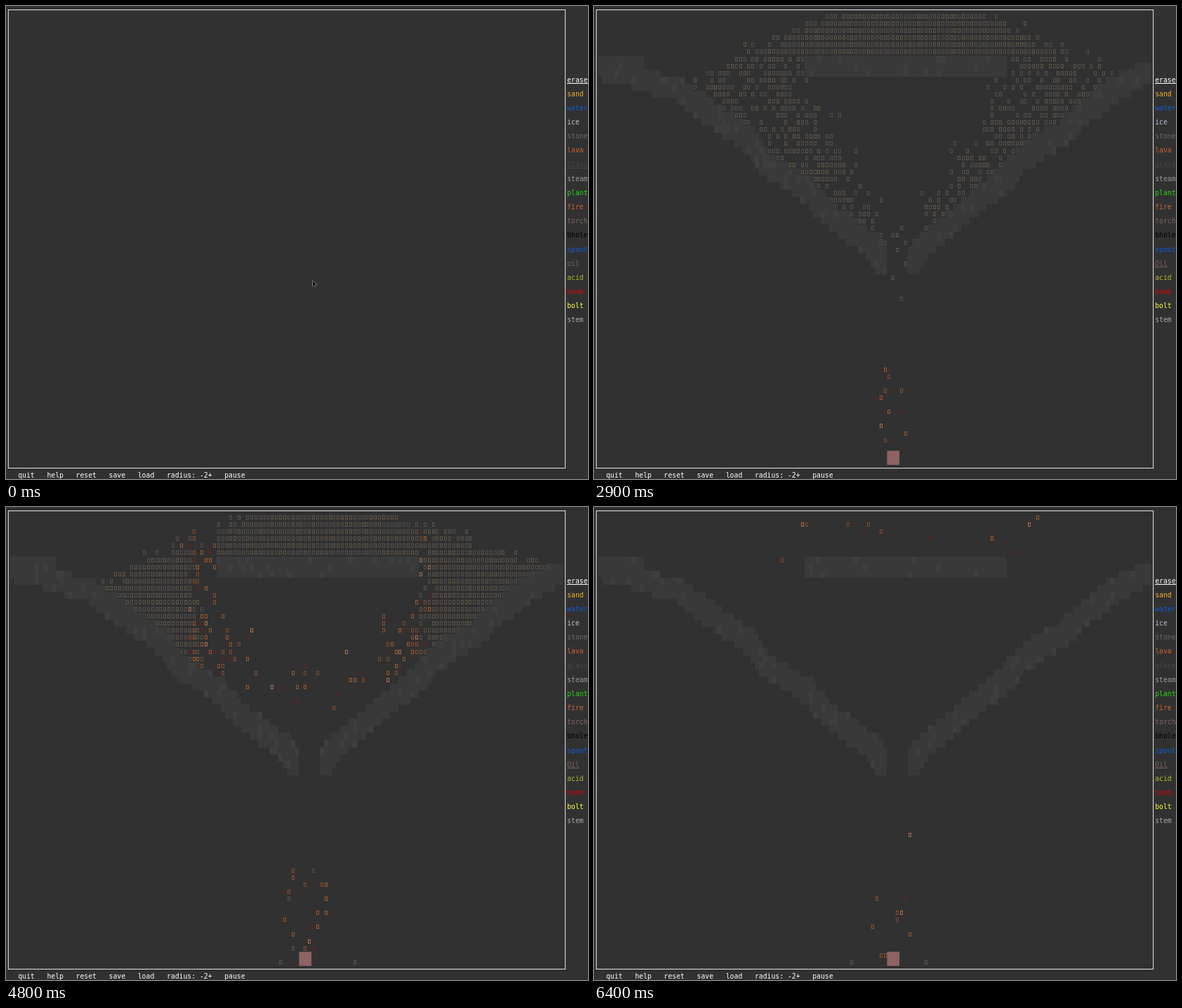
An HTML page with a canvas for the animation above (6.5 s loop, 829 by 675 pixels).

```html
<!DOCTYPE html>
<html lang="en">
<head>
<meta charset="utf-8">
<title>Falling sand</title>
<style>
  html, body { margin: 0; width: 100%; height: 100%; overflow: hidden; background: #313131; }
  #stage { position: relative; width: 829px; height: 675px; overflow: hidden; }
  canvas { position: absolute; left: 0; top: 0; }
  .label {
    position: absolute; white-space: pre; color: #fff;
    font: 9.77px/10px "DejaVu Sans Mono", monospace;
  }
  .label.on { box-shadow: inset 0 -1px 0 currentColor; }
</style>
</head>
<body>
<div id="stage"><canvas id="view" width="829" height="675"></canvas></div>
<script>
const LOOP = 6500, STEP = 100;
const COLS = 141, ROWS = 67;
const CW = 829 / COLS, RH = 675 / ROWS;
const LAST_COL = 134, LAST_ROW = 64, THROAT = 73, SHELF_MID = 75;
const stage = document.getElementById('stage');
const ctx = document.getElementById('view').getContext('2d');

const menu = [
  ['erase', '#ffffff'], ['sand', '#f6b02c'], ['water', '#0b5fd6'], ['ice', '#b2c2d4'],
  ['stone', '#696969'], ['lava', '#d0622a'], ['glass', '#464646'], ['steam', '#9b9b9b'],
  ['plant', '#24d80f'], ['fire', '#c9652d'], ['torch', '#83645d'], ['bhole', '#000000'],
  ['spout', '#0b5fd6'], ['oil', '#7d6059'], ['acid', '#b3b52a'], ['bomb', '#c60b0b'],
  ['bolt', '#fcfc40'], ['stem', '#a9a9a9']
];
const oilTones = ['#554d49', '#5d5349', '#625643', '#514c49', '#594f4a'];
const fireTones = ['#9a5529', '#804829', '#a97050', '#a25a28', '#612421', '#8a4d2f'];

function hash(a, b = 0, c = 0) {
  let h = Math.imul(a + 11, 374761393) ^ Math.imul(b + 57, 668265263) ^ Math.imul(c + 131, 1274126177);
  h = Math.imul(h ^ (h >>> 15), 2246822519);
  h = Math.imul(h ^ (h >>> 13), 3266489917);
  return ((h ^ (h >>> 16)) >>> 0) / 4294967296;
}
const clamp = (v, lo, hi) => Math.min(hi, Math.max(lo, v));
const pick = (list, h) => list[Math.floor(h * list.length)];

// Glass: cells in the order a 3 by 3 brush paints them along a path.
const glass = new Set();
const cellId = (c, r) => r * COLS + c;
function stroke(...path) {
  for (let i = 1; i < path.length; i++) {
    const [c0, r0] = path[i - 1], [c1, r1] = path[i];
    const n = 2 * Math.max(Math.abs(c1 - c0), Math.abs(r1 - r0));
    for (let s = 0; s <= n; s++) {
      const c = Math.round(c0 + (c1 - c0) * s / n);
      const r = Math.round(r0 + (r1 - r0) * s / n);
      for (let k = 0; k < 9; k++) glass.add(cellId(c - 1 + k % 3, r - 1 + Math.floor(k / 3)));
    }
  }
}
stroke([10, 9], [3, 9], [2, 8], [10, 8], [10, 10], [19, 11], [28, 15], [38, 19],
  [41, 22], [50, 25], [56, 29], [68, 34], [69, 36]);
stroke([133, 9], [126, 11], [115, 16], [115, 17], [108, 19], [101, 22], [101, 23],
  [88, 29], [80, 33], [77, 35], [77, 36]);
const arms = [...glass];
stroke([52, 8], [98, 8]);
const panes = [...glass];

// First and last open column between the two arms, per row.
const openFrom = Array(ROWS).fill(1), openTo = Array(ROWS).fill(LAST_COL);
for (const id of arms) {
  const c = id % COLS, r = Math.floor(id / COLS);
  if (c < THROAT) openFrom[r] = Math.max(openFrom[r], c + 1);
  else openTo[r] = Math.min(openTo[r], c - 1);
}
function isOpen(c, r) {
  return r >= 1 && r <= LAST_ROW && c >= openFrom[r] && c <= openTo[r] && !glass.has(cellId(c, r));
}

function addLabel(text, col, row, color) {
  const el = document.createElement('span');
  el.className = 'label';
  el.textContent = text;
  el.style.left = (col * CW - 0.4) + 'px';
  el.style.top = (row * RH) + 'px';
  el.style.color = color;
  stage.append(el);
  return el;
}
const items = menu.map(([name, color], i) => addLabel(name, 136, 10 + 2 * i, color));
addLabel('quit   help   reset   save   load   radius: -2+   pause', 3, 66, '#ffffff');

function showMenu(t) {
  const chosen = t < 600 ? 'glass' : t < 1000 ? 'torch' : 'oil';
  menu.forEach(([name], i) => {
    const on = name === chosen;
    items[i].textContent = on ? name[0].toUpperCase() + name.slice(1) : name;
    items[i].classList.toggle('on', on || i === 0);
  });
}

function mark(c, r, color) {
  ctx.strokeStyle = color;
  ctx.strokeRect(Math.round((c + 0.5) * CW - 2) + 0.5, Math.round((r + 0.5) * RH - 3) + 0.5, 3, 5);
}
function flame(c, r, seed, f) {
  c = Math.round(c);
  r = Math.max(1 + Math.floor(hash(seed, f, 6) * 4), Math.round(r));
  if (isOpen(c, r)) mark(c, r, pick(fireTones, hash(seed, f, 5)));
}

function drawGlass(t, f) {
  const count = Math.round(clamp(t / 600, 0, 1) * panes.length);
  for (const id of panes.slice(0, count)) {
    const c = id % COLS, r = Math.floor(id / COLS);
    const x = Math.round(c * CW), y = Math.round(r * RH);
    ctx.fillStyle = hash(c, r, f) < 0.1 ? '#3e3e3e' : '#393939';
    ctx.fillRect(x, y, Math.round((c + 1) * CW) - x, Math.round((r + 1) * RH) - y);
  }
}

// Chance that a cell holds oil: dense inside the pile, loose at its edges.
function oilChance(c, r, t) {
  const k = clamp((t - 1500) / 2400, 0, 1);
  const left = 62 - 8 * Math.min(1, 3 * k) - (1.7 + 1.8 * Math.min(1, 2 * k)) * (r - 1);
  const right = 88 + 10 * Math.min(1, 2 * k) + (1.5 + 3.5 * k) * (r - 1);
  let depth = Math.min(c - left, right - c);
  let fill = 1;
  if (r >= 7) {
    fill = Math.min(1, 0.005 + Math.max(0, (t - 2200) / 900) ** 2);
    const drop = Math.max(0, r - 10);
    const inner = c < THROAT ? 50 + 0.9 * drop - c : c - 101 + 1.12 * drop;
    depth = Math.min(depth, inner + (r < 10 ? 4 : 1));
  }
  if (depth < -4) return 0;
  return (depth < 0 ? 0.1 : Math.min(1, 0.35 + 0.11 * depth)) * fill;
}

// When fire reaches a cell: it climbs from the throat, then closes in over the shelf.
function burnTime(c, r) {
  const jitter = (hash(c, r, 7) - 0.5) * 130;
  const inside = 24.5 - Math.abs(c - SHELF_MID);
  if (r < 7 && inside > 0) return 4850 + inside * 48 + jitter;
  return 4270 + Math.max(0, Math.abs(c - THROAT) - 8) * 27 + jitter;
}

function drawOil(t, f) {
  if (t < 1500) return;
  for (let r = 1; r <= 33; r++) {
    for (let c = openFrom[r]; c <= openTo[r]; c++) {
      if (!isOpen(c, r)) continue;
      const chance = oilChance(c, r, t);
      const age = t - burnTime(c, r);
      if (age < 0) {
        if (hash(c, r, f) < chance) mark(c, r, pick(oilTones, hash(r, c, f)));
        continue;
      }
      const seed = cellId(c, r);
      if (hash(seed, 1) > chance * 0.6 || age > 120 + 850 * hash(seed, 2) ** 2.5) continue;
      flame(c + (hash(seed, 3) - 0.5) * age / 10, r + (0.25 - hash(seed, 4)) * age / 70, seed, f);
    }
  }
}

// A looping particle: which turn it is on, how far along, and when that turn began.
function particle(t, i, life) {
  const turn = t / life + hash(i, 22);
  const k = Math.floor(turn);
  return { k, p: turn - k, born: t - (turn - k) * life };
}

function drawStream(t, f) {
  for (let i = 0; i < 36; i++) {
    const { k, p, born } = particle(t, i, 800 + 400 * hash(i, 21));
    if (born < 2600 || born > 4150 || hash(i, k, 23) > 0.85) continue;
    const r = Math.round(31 + p * 33);
    const spread = 4 + Math.max(0, r - 38) * 0.45;
    const c = Math.round(73.3 + (hash(i, k, 24) - 0.5) * spread + (hash(i, f, 25) - 0.5) * 2);
    if (t > 3900 && hash(i, k, 26) < 0.6) flame(c, r, i + 500, f);
    else if (isOpen(c, r) && r < 63) mark(c, r, pick(oilTones, hash(i, k, 27)));
  }
  const drops = t < 3700 ? 0 : t < 4800 ? 4 : 2;
  for (let i = 0; i < drops; i++) {
    const side = i % 2 ? 1 : -1;
    mark(Math.round(72.5 + side * (6 + 11 * hash(i, f, 28))), LAST_ROW, oilTones[1]);
  }
}

function drawTorch(t, f) {
  if (t < 700) return;
  for (let i = 40; i < 60; i++) {
    const { k, p, born } = particle(t, i, 600 + 500 * hash(i, 31));
    if (born < 700 || p > 0.35 + 0.65 * hash(i, k, 33)) continue;
    const r = 63.5 - p * (12 + 12 * hash(i, k, 34));
    const c = 72.3 + (hash(i, k, 35) - 0.5) * (5 + 14 * p) + (hash(i, f, 36) - 0.5) * 2;
    flame(c, r, i + 900, f);
  }
  ctx.fillStyle = '#8e6362';
  ctx.fillRect(71 * CW, 63 * RH, 3 * CW, 2 * RH);
}

function drawPointer() {
  ctx.fillStyle = '#000';
  ctx.strokeStyle = '#ddd';
  const arrow = new Path2D('M437 392v8l1.8-1.6 1.2 2.2 1-.6-1-2.2 2-.4z');
  ctx.stroke(arrow);
  ctx.fill(arrow);
}

function draw(f) {
  const t = f * STEP;
  ctx.fillStyle = '#313131';
  ctx.fillRect(0, 0, 829, 675);
  ctx.lineWidth = 1;
  drawGlass(t, f);
  drawOil(t, f);
  drawStream(t, f);
  drawTorch(t, f);
  if (t === 0) drawPointer();
  ctx.strokeStyle = '#e6e6e6';
  ctx.strokeRect(3.3, 5.5, 793.3, 654);
  showMenu(t);
}

const start = performance.now();
let shown = -1;
function tick() {
  const f = Math.floor(((performance.now() - start) % LOOP) / STEP);
  if (f !== shown) draw(shown = f);
  requestAnimationFrame(tick);
}
tick();
</script>
</body>
</html>
```
